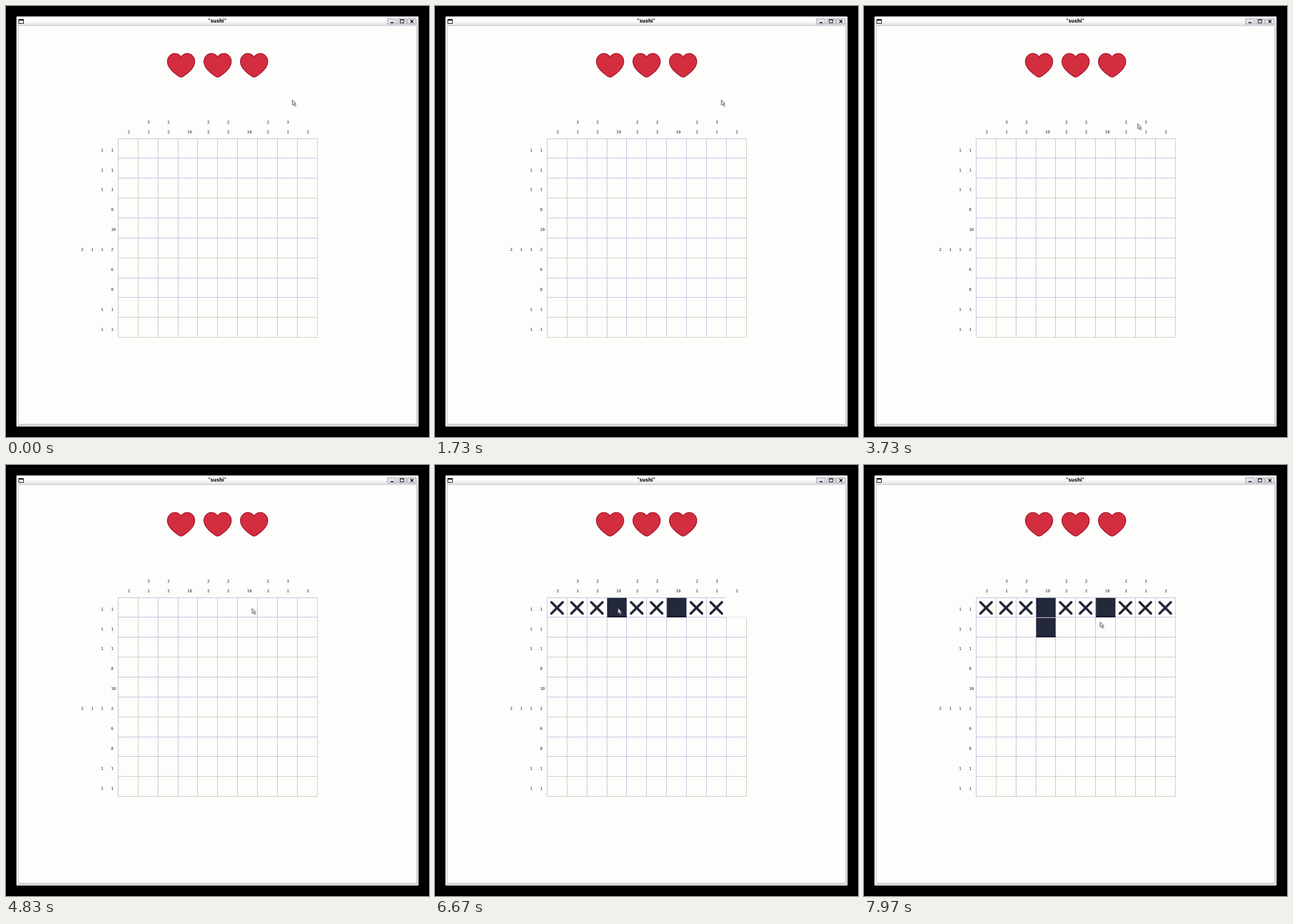
Animation, 741 px wide and 755 px high, one loop 8 s. Source, as an HTML page:

```html
<!DOCTYPE html>
<html lang="en">
<head>
<meta charset="utf-8">
<title>Nonogram</title>
<style>
html, body { margin: 0; width: 100%; height: 100%; overflow: hidden; background: #000; }
svg { display: block; width: 741px; height: 755px; }
.title { font: bold 8px "DejaVu Sans", sans-serif; text-anchor: middle; }
.hint { font: 7px "DejaVu Sans Mono", monospace; fill: #22222c; }
.heart { fill: #d22e3f; stroke: #a3132a; stroke-width: 1.3; }
.cross { fill: none; stroke: #1d1e31; stroke-width: 4; stroke-linecap: round; }
.timed { opacity: 0; animation: 8s step-end infinite; }
.fill-1 { animation-name: fill-1; }
.fill-2 { animation-name: fill-2; }
.fill-3 { animation-name: fill-3; }
.marks { animation-name: marks; }
.gap { animation-name: gap; }
.last-mark { animation-name: last-mark; }
@keyframes fill-1 { 0% { opacity: 0 } 63% { opacity: 1 } }
@keyframes fill-2 { 0% { opacity: 0 } 82.5% { opacity: 1 } }
@keyframes fill-3 { 0% { opacity: 0 } 92% { opacity: 1 } }
@keyframes marks { 0% { opacity: 0 } 83% { opacity: 1 } }
@keyframes gap { 0% { opacity: 0 } 83% { opacity: 1 } 83.7% { opacity: 0 } }
@keyframes last-mark { 0% { opacity: 0 } 83.7% { opacity: 1 } }
.cursor { animation: move 8s linear infinite; }
@keyframes move {
  0%, 42.5% { transform: translate(501px, 164px); animation-timing-function: ease-in }
  46.625% { transform: translate(479px, 205.5px) }
  52% { transform: translate(452px, 233px); animation-timing-function: ease-out }
  57.5%, 67% { transform: translate(430.5px, 250.5px); animation-timing-function: ease-in-out }
  76.25% { transform: translate(328px, 250.5px) }
  79%, 86% { transform: translate(320px, 250.5px); animation-timing-function: ease-in-out }
  89.5%, 93% { transform: translate(318px, 279px); animation-timing-function: ease-in-out }
  99.6%, 100% { transform: translate(413px, 274.5px) }
}
</style>
</head>
<body>
<svg id="stage" viewBox="0 0 741 755">
  <defs>
    <linearGradient id="bar" x1="0" y1="0" x2="0" y2="1">
      <stop offset=".45" stop-color="#fff"/>
      <stop offset="1" stop-color="#dedee2"/>
    </linearGradient>
  </defs>
  <rect width="741" height="755"/>
  <rect x="18.5" y="18.5" width="704" height="718" rx="1" fill="#d8d8dc" stroke="#aaaab0"/>
  <path d="M20 735V20H721" fill="none" stroke="#f4f4f6" stroke-width="2"/>
  <rect x="20" y="19" width="701" height="15" fill="url(#bar)"/>
  <rect x="21.5" y="34.5" width="698" height="698" fill="#fdfdfc" stroke="#c6c6d0"/>
  <text class="title" x="370" y="29">"sushi"</text>
  <rect x="22.5" y="23.5" width="8" height="7" fill="#fff" stroke="#000"/>
  <path d="M22 24.5H31" stroke="#000" stroke-width="2"/>
  <g id="buttons" fill="#e5e5eb" stroke="#9b9ba8"></g>
  <g fill="none" stroke="#000">
    <path d="M673.5 29.2H679" stroke-width="1.6"/>
    <path d="M690.5 24H697V29.5H690.5Z M690 24.5H697.5"/>
    <path d="M708.5 24.5L713.5 29.5M713.5 24.5L708.5 29.5" stroke-width="1.5"/>
  </g>
  <g id="hearts"></g>
  <g id="hints"></g>
  <g id="grid"></g>
  <g id="cells"></g>
  <g class="cursor">
    <path d="M3 3V12.5L5 10.5L6.8 14L8.5 13L7 10H10Z" fill="#888" opacity=".28"/>
    <path d="M.5 .5V9.5L2.6 7.8L4.4 11.2L6 10.3L4.5 7.2L7 6.8Z" fill="#dcdcdc" stroke="#55555a" stroke-width=".9"/>
  </g>
</svg>
<script>
const LEFT = 196.5, TOP = 232, CELL = 34.87, COUNT = 10, STEP = 17.45;
const columns = ["2", "3 1", "2 2", "10", "2 2", "2 2", "10", "2 2", "3 1", "2"];
const rows = ["1 1", "1 1", "1 1", "8", "10", "2 1 1 2", "6", "8", "1 1", "1 1"];
const x = c => LEFT + c * CELL;
const y = r => TOP + r * CELL;
const put = (id, markup) => { document.getElementById(id).innerHTML += markup; };
const hint = (text, px, py) => put("hints", `<text class="hint" x="${px}" y="${py}">${text}</text>`);

for (const bx of [668.5, 686.5, 703.5])
  put("buttons", `<rect x="${bx}" y="22.5" width="15" height="9"/>`);

for (const hx of [306.7, 370.7, 434.6])
  put("hearts", `<path class="heart" transform="translate(${hx} 0)" d="M0 89
    C-5 82.5-12 82-16.5 84.5C-23 88-25.5 95.5-23 103C-20.5 110.5-11 118.5-4 123.3
    Q0 126 4 123.3C11 118.5 20.5 110.5 23 103C25.5 95.5 23 88 16.5 84.5C12 82 5 82.5 0 89Z"/>`);

// Hints are packed against the grid, nearest one last.
columns.forEach((list, c) => list.split(" ").reverse().forEach((text, i) =>
  hint(text, x(c) + 16.4, 223 - i * STEP)));
rows.forEach((list, r) => list.split(" ").reverse().forEach((text, i) =>
  hint(text, 183.9 - i * STEP, y(r) + 22.7)));

const line = (d, warm) => put("grid", `<path d="${d}" stroke="${warm ? "#c8c8b8" : "#bdbddd"}"/>`);
for (let i = 0; i <= COUNT; i++) {
  const px = Math.floor(x(i)) + .5, py = Math.floor(y(i)) + .5;
  line(`M${px} ${TOP}V${y(COUNT)}`, i === 1 || i === COUNT);
  line(`M${LEFT} ${py}H${x(COUNT)}`, [3, 6, 9, 10].includes(i));
}

const fill = (c, r, name) => put("cells", `<g class="timed ${name}">
  <rect x="${x(c) + .5}" y="${y(r) + .8}" width="${CELL - .8}" height="${CELL - .8}" fill="#23283a"/>
  <rect x="${x(c) + .5}" y="${y(r) + 33}" width="${CELL - .8}" height="1.8" fill="#14152c"/></g>`);
const cross = (c, name) => put("cells", `<path class="cross timed ${name}"
  transform="translate(${x(c) + 17.3} 250.2)" d="M-10-10L10 10M10-10L-10 10"/>`);

fill(6, 0, "fill-1");
fill(3, 0, "fill-2");
fill(3, 1, "fill-3");
for (const c of [0, 1, 2, 4, 5, 7, 8]) cross(c, "marks");
put("cells", `<rect class="timed gap" x="510" y="231.5" width="36" height="35" fill="#fdfdfc"/>`);
cross(9, "last-mark");
put("cells", `<path class="timed fill-3" d="M${x(3)} 266.8H${x(4)}" stroke="#a5a5b0" stroke-width=".8"/>`);
</script>
</body>
</html>
```
